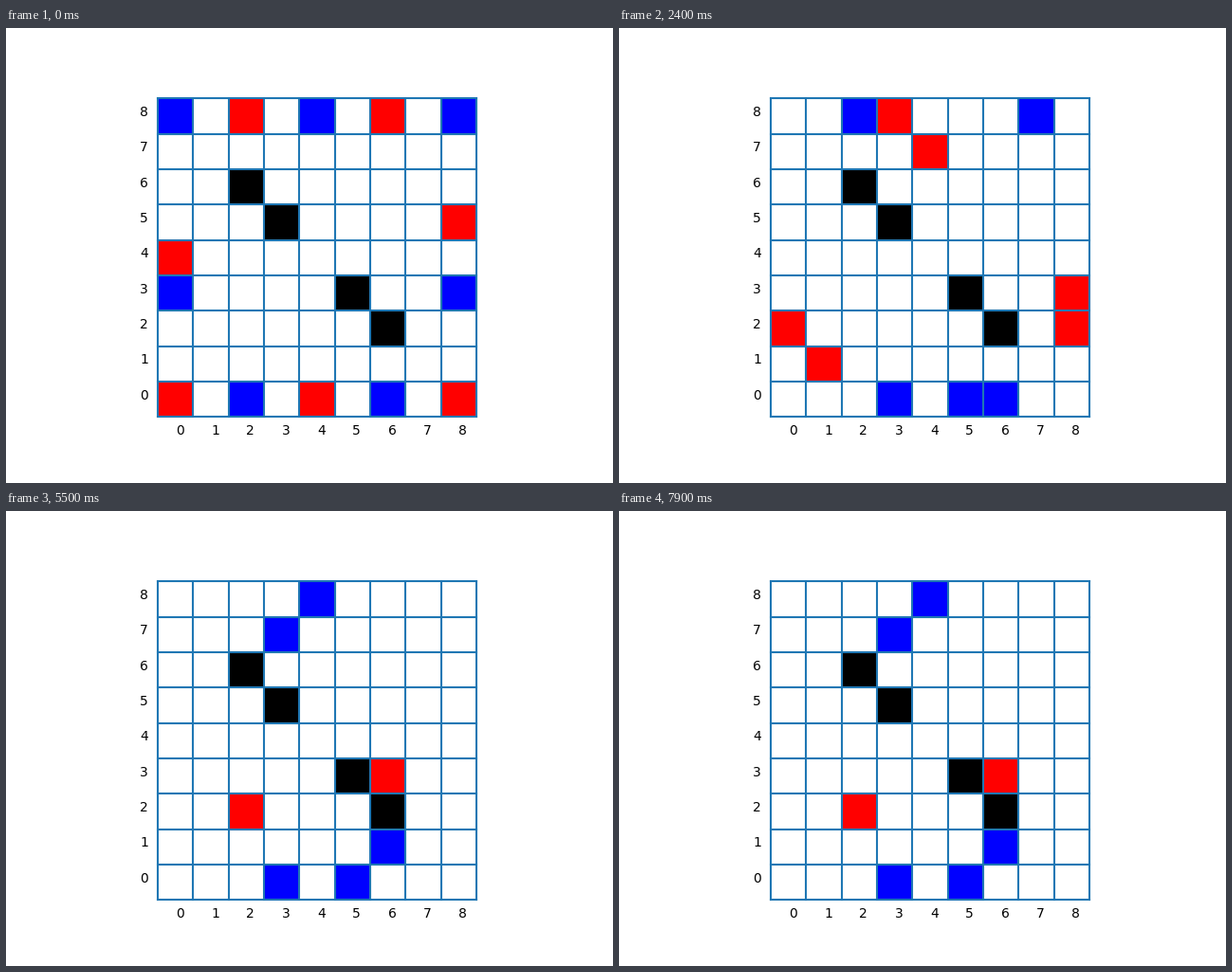
A matplotlib script for the animation above (8 s loop, 640 px wide and 480 px high).

```python
import matplotlib.pyplot as plt
from matplotlib.animation import FuncAnimation
from matplotlib.patches import Rectangle

SIZE = 9
FRAMES = 80

# Squares are "column row"; "x" marks a captured square.
BLUE_START = "08 48 88 03 83 20 60"
RED_START = "28 68 85 04 00 40 80"
BLOCKS = "26 35 53 62"

BLUE_MOVES = """
20>30 60>50x40 83>73 73>72 72>71 03>02 02>01 71>61 61>60 08>18
18>28 88>78 78>68 68>58 28>38x48 58>48 50>40 40>50 50>40x70 40>41
38>37x36 41>42 42>43 43>42 42>41 41>51x52 51>61 60>50
""".split()
RED_MOVES = """
80>81 81>82 85>84 84>83 28>38 68>58x48 04>03 03>02x01 00>01 58>48
48>47 01>11 11>21 38>48 82>81 81>80 80>70 21>31 47>46 46>36
83>73 73>63 31>41 41>51 51>52 02>12 12>22
""".split()

# Both sides end by stepping back and forth.
BLUE_LOOP = ["50>40", "40>50"]
RED_LOOP = ["22>12", "12>22"]


def pick(moves, loop, turn):
    if turn < len(moves):
        return moves[turn]
    return loop[(turn - len(moves)) % 2]


def play():
    board = {}
    for names, color in ((BLUE_START, "blue"), (RED_START, "red"), (BLOCKS, "black")):
        board.update((name, color) for name in names.split())
    boards = [dict(board)]
    for step in range(FRAMES - 1):
        turn, red = divmod(step, 2)
        if red:
            move = pick(RED_MOVES, RED_LOOP, turn)
        else:
            move = pick(BLUE_MOVES, BLUE_LOOP, turn)
        path, _, taken = move.partition("x")
        start, end = path.split(">")
        board[end] = board.pop(start)
        board.pop(taken, None)
        boards.append(dict(board))
    return boards


boards = play()

fig, ax = plt.subplots(figsize=(6.4, 4.8), dpi=100)
pad = 0.05 * SIZE
ax.set_xlim(-pad, SIZE + pad)
ax.set_ylim(-pad, SIZE + pad)
ax.set_aspect("equal")
ax.axis("off")

for i in range(SIZE + 1):
    ax.plot([i, i], [0, SIZE], color="C0", lw=1.5)
    ax.plot([0, SIZE], [i, i], color="C0", lw=1.5)
for i in range(SIZE):
    ax.text(i + 0.5, -0.5, str(i))
    ax.text(-0.5, i + 0.5, str(i))

cells = {}
for x in range(SIZE):
    for y in range(SIZE):
        cell = Rectangle((x, y), 1, 1, facecolor="white", edgecolor="none", zorder=1)
        cells[f"{x}{y}"] = ax.add_patch(cell)


def update(frame):
    for name, cell in cells.items():
        cell.set_facecolor(boards[frame].get(name, "white"))
    return list(cells.values())


anim = FuncAnimation(fig, update, frames=FRAMES, interval=100, repeat=True, repeat_delay=0)
plt.show()
```
